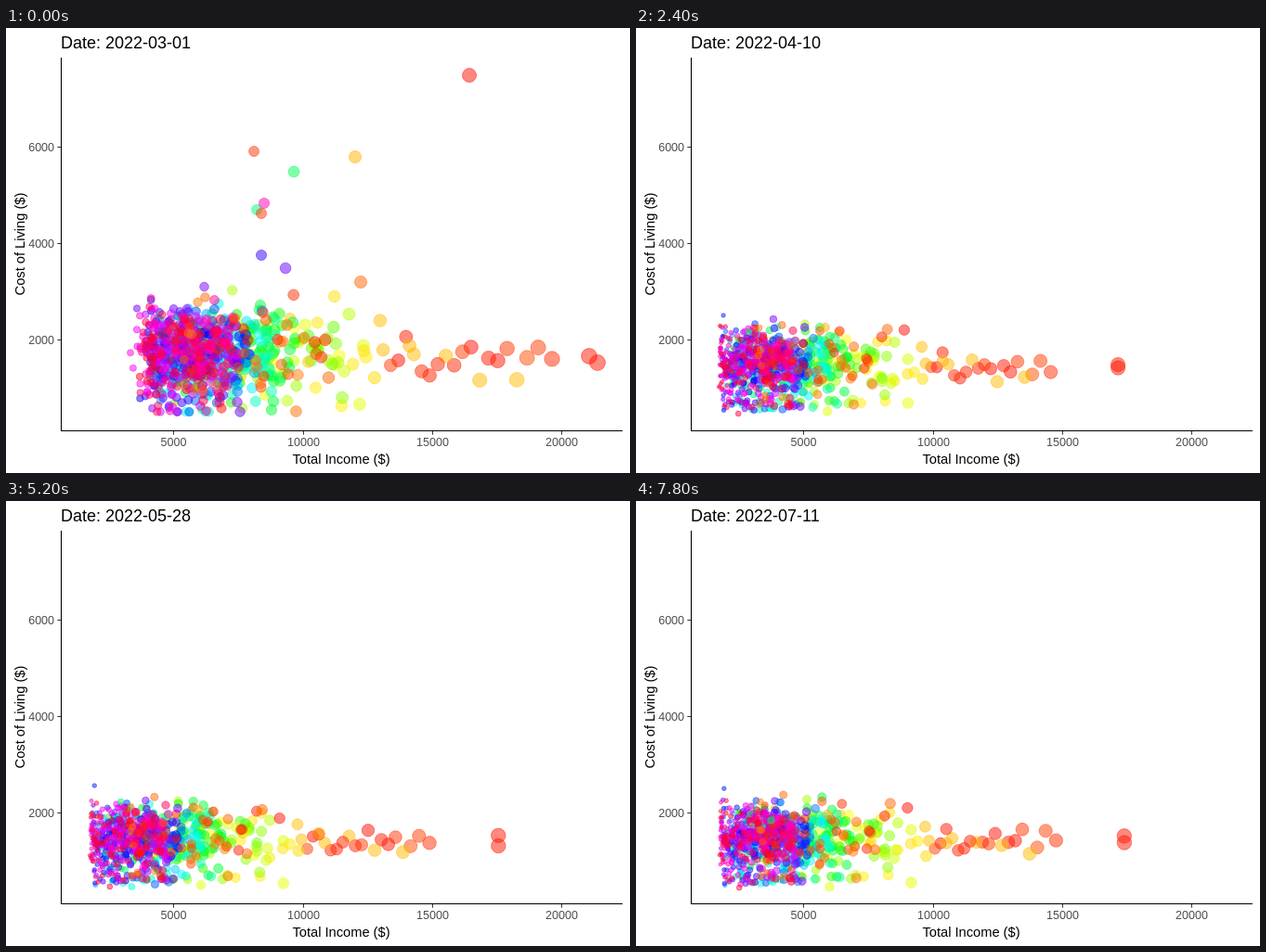
An HTML page with a canvas for the animation above (8 s loop, 672 px wide and 480 px high).

```html
<!DOCTYPE html>
<html lang="en">
<head>
<meta charset="utf-8">
<title>Income and cost of living</title>
<style>
  html, body { margin: 0; width: 100%; height: 100%; overflow: hidden; background: #fff; }
  svg, canvas { position: absolute; left: 0; top: 0; }
  text { font-family: "Liberation Sans", Arial, sans-serif; font-size: 14.67px; }
  .tick text { font-size: 12.5px; fill: #4d4d4d; }
  .tick path { stroke: #333; }
</style>
</head>
<body>
<svg width="672" height="480">
  <text id="date" x="59" y="22" style="font-size:18px"></text>
  <path d="M59.5 32V434.5H664" fill="none" stroke="#000" stroke-width="1.07"/>
  <g id="ticks" class="tick"></g>
  <text x="361" y="470" text-anchor="middle">Total Income ($)</text>
  <text transform="translate(20 233) rotate(-90)" text-anchor="middle">Cost of Living ($)</text>
</svg>
<canvas id="plot" width="672" height="480"></canvas>
<script>
const ZERO_X = 42.2, ZERO_Y = 440.5;            // pixel position of value 0
const STEP_MS = 200, STEPS = 40, DAYS_PER_STEP = 3.385;
const KNOT_DAYS = [0, 30, 61, 92, 122, 153];
const INCOME_FACTOR = [1, 1, 1.044, 1.038, 1.031, 1.026];

let seed = 20220301;
function random() {
  seed = (seed + 0x6D2B79F5) | 0;
  let t = Math.imul(seed ^ (seed >>> 15), 1 | seed);
  t = (t + Math.imul(t ^ (t >>> 7), 61 | t)) ^ t;
  return ((t ^ (t >>> 14)) >>> 0) / 4294967296;
}
const between = (a, b) => a + (b - a) * random();
const normal = sd => (random() + random() + random() + random() - 2) * 1.73 * sd;
const repeat = (count, make) => Array.from({ length: count }, (_, i) => make(i, i / count));

// Scaling of a pixel coordinate about the zero of its axis
const scaleX = (x, k) => ZERO_X + (x - ZERO_X) * k;
const scaleY = (y, k) => ZERO_Y + (y - ZERO_Y) * k;

// Moves from the first day to the second knot, then drifts around settledY
function makePoint(hue, x0, y0, x1, y1, settledY, wobble) {
  const xs = INCOME_FACTOR.map((k, i) => i ? scaleX(x1, k) : x0);
  const ys = KNOT_DAYS.map((_, i) => i < 2 ? [y0, y1][i] : settledY + normal(wobble));
  return { color: `hsl(${hue} 100% 50%)`, xs, ys };
}

// The higher the starting cost, the further the fall
function outlier([x0, y0, hue]) {
  const x1 = x0 - 1.11 * (93 + (300 - y0) * 0.4);
  return makePoint(hue, x0, y0, x1, 320, 334, 6);
}

function highEarner(x0, y0, hue, incomeKept) {
  const y1 = 368 + (y0 - 360) * 0.6 + normal(3);
  return makePoint(hue, x0, y0, scaleX(x0, incomeKept), y1, y1 + (369 - y1) * 0.4, 5);
}

function household(hue, minX, maxX) {
  const x = minX + (maxX - minX) * random() ** 1.25;
  const lowCost = random() < 0.07;
  const y = lowCost ? 408 + normal(3) : Math.min(362 + normal(17), 402);
  return makePoint(hue,
    scaleX(x, 1.12) + 53 + normal(6), Math.min(scaleY(y, 1.22) + 2 + normal(10), 414),
    scaleX(x, 1 / 1.036), scaleY(y, 1.04) + normal(3), y, lowCost ? 1.5 : 5);
}

// Hues run from yellow (wide income range) to pink (narrow, low incomes)
function rainbowHousehold(i, t) {
  const hue = 42 + 313 * t ** 0.8;
  const width = Math.exp((45 - hue) / 90);
  return household(hue, 89 + 35 * width, 165 + 185 * width);
}

const crowd = repeat(840, rainbowHousehold)
  .map((point, i) => ({ point, order: i + random() * 200 }))
  .sort((a, b) => a.order - b.order)
  .map(entry => entry.point);

// x, y on the first day; hue
const outliers = [
  [499, 51, 3], [267, 133, 12], [376, 139, 42], [310, 155, 140], [270, 196, 148],
  [278, 189, 318], [275, 200, 12], [275, 245, 253], [301, 259, 265], [382, 274, 24]
];

const points = [
  highEarner(637, 361, 5, 0.79),
  highEarner(628, 354, 5, 0.802),
  ...repeat(20, (i, t) => highEarner(
    588 - 190 * t ** 0.85, 358 + normal(11), i % 4 === 3 ? 44 : between(3, 18), 0.73)),
  ...crowd,
  ...repeat(45, () => household(between(2, 30), 132, 270)),
  ...outliers.map(outlier)
];

const ctx = document.getElementById("plot").getContext("2d");
const dateLabel = document.getElementById("date");

document.getElementById("ticks").innerHTML =
  repeat(4, i => {
    const value = 5000 * (i + 1);
    const x = Math.round(ZERO_X + value * 0.02785) - 0.5;
    return `<path d="M${x} 435v3.7"/><text x="${x}" y="451" text-anchor="middle">${value}</text>`;
  }).join("") +
  repeat(3, i => {
    const value = 2000 * (i + 1);
    const y = ZERO_Y - value * 0.052;
    return `<path d="M59 ${y}h-3.7"/><text x="52" y="${y + 4.5}" text-anchor="end">${value}</text>`;
  }).join("");

// Dot size grows with income
function drawPoint(x, y, color) {
  const share = Math.max(0, (x - 88) / (637 - 88));
  const radius = 1.5 + 7 * Math.sqrt(share);
  ctx.fillStyle = ctx.strokeStyle = color;
  ctx.beginPath();
  ctx.arc(x, y, radius, 0, 2 * Math.PI);
  ctx.fill();
  ctx.stroke();
}

function draw(step) {
  const day = step * DAYS_PER_STEP;
  const next = KNOT_DAYS.findIndex(d => d > day), last = next - 1;
  const mix = (day - KNOT_DAYS[last]) / (KNOT_DAYS[next] - KNOT_DAYS[last]);
  const at = values => values[last] + (values[next] - values[last]) * mix;

  dateLabel.textContent = "Date: " +
    new Date(Date.UTC(2022, 2, 1 + Math.floor(day))).toISOString().slice(0, 10);
  ctx.clearRect(0, 0, 672, 480);
  ctx.globalAlpha = 0.5;
  ctx.lineWidth = 0.9;
  for (const p of points) drawPoint(at(p.xs), at(p.ys), p.color);
}

const start = performance.now();
let shown = -1;
function tick() {
  const step = Math.floor((performance.now() - start) / STEP_MS) % STEPS;
  if (step !== shown) draw(shown = step);
  requestAnimationFrame(tick);
}
tick();
</script>
</body>
</html>
```
